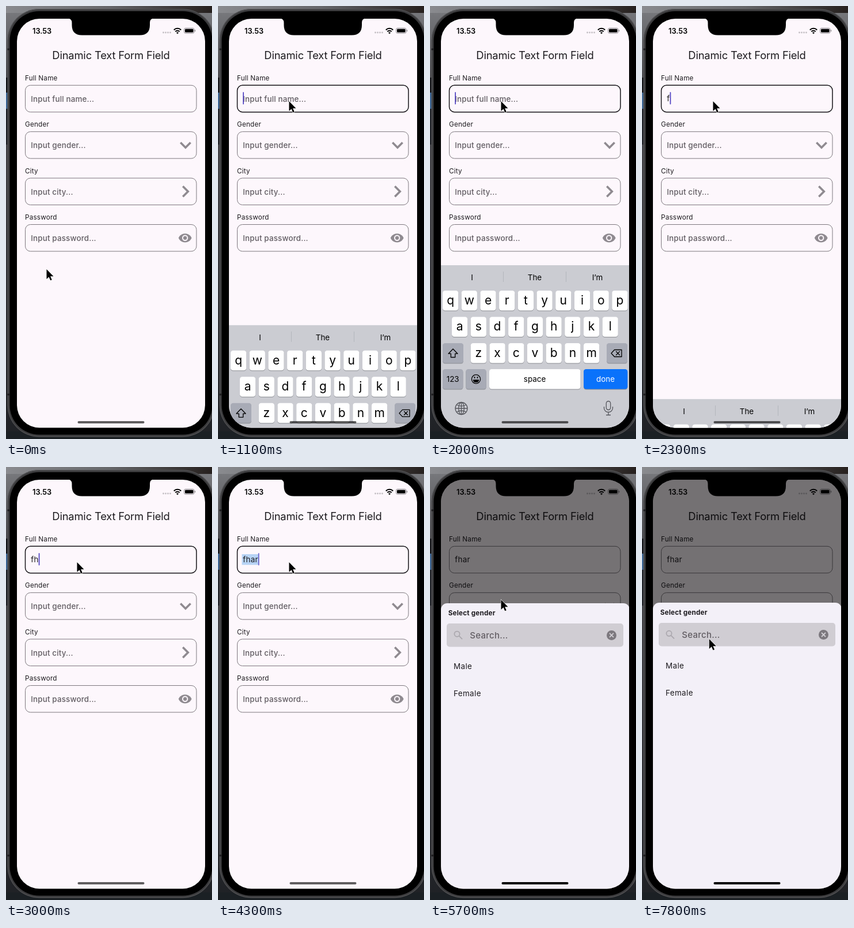
These frames come from a looping animation (358x750 px, 8 s). An HTML page:

```html
<!DOCTYPE html>
<html lang="en">
<head>
<meta charset="utf-8">
<title>Text form fields</title>
<style>
  html, body { margin: 0; width: 100%; height: 100%; overflow: hidden; background: #000; }
  svg { display: block; width: 358px; height: 750px; }
  text { font-family: Inter, "Open Sans", sans-serif; font-optical-sizing: none; fill: #1d1b1f; white-space: pre; }
  .mid { text-anchor: middle; }
  .title { font-size: 18.4px; letter-spacing: -.2px; }
  .label { font-size: 11.7px; letter-spacing: .2px; }
  .hint { font-size: 13.4px; font-weight: 500; letter-spacing: .15px; fill: #625d63; }
  .value { font-size: 13.4px; letter-spacing: .3px; }
  .clock { font-size: 12.8px; font-weight: 600; fill: #000; }
  .key { font-size: 21px; fill: #000; }
  .word { font-size: 13.4px; fill: #000; }
  .box { fill: none; stroke: #7d787e; stroke-width: 1; }
  .chevron { fill: none; stroke: #8f8a90; stroke-width: 3.6; }
  .line { fill: none; stroke: #55565c; stroke-width: 1.3; }
  .ink { fill: none; stroke: #000; stroke-width: 1.3; stroke-linejoin: round; stroke-linecap: round; }
</style>
</head>
<body>
<svg id="stage" viewBox="0 0 358 750"></svg>
<script>
const LOOP = 8000, STEP = 100;
const BOTTOM = 731, KEYS_H = 282, SHEET_TOP = 235;
const NAME = 'fhar';

const rect = (x, y, w, h, r, attrs) =>
  `<rect x="${x}" y="${y}" width="${w}" height="${h}" rx="${r}" ${attrs}/>`;
const text = (x, y, cls, str, attrs = '') =>
  `<text x="${x}" y="${y}" class="${cls}" ${attrs}>${str}</text>`;

function field(i, label, hint) {
  const y = 137.3 + i * 80.4;
  return text(33, y - 8.6, 'label', label) +
    rect(33.5, y, 297.5, 46.4, 9, `class="box" id="box${i}"`) +
    text(43.3, y + 28.4, 'hint', hint, `id="hint${i}"`);
}

function key(x, y, w, fill = '#fff') {
  return rect(x, y + 1, w, 34.5, 4.2, 'fill="#8b8d93"') + rect(x, y, w, 34.5, 4.2, `fill="${fill}"`);
}

function keyRow(letters, x0, y) {
  return [...letters].map((c, i) => {
    const x = x0 + i * 32.7;
    return key(x, y, 27.2) + text(x + 13.6, y + 23.8, 'key mid', c);
  }).join('');
}

function keyboard() {
  const gray = '#a8abb6';
  return `<g id="keys">
    ${rect(19, 0, 328, 300, 0, 'fill="#cbccd2"')}
    ${text(73, 26, 'word mid', 'I')}${text(182, 26, 'word mid', 'The')}${text(291, 26, 'word mid', 'I’m')}
    <path d="M127.5 11v18M236.5 11v18" stroke="#b4b6bc"/>
    ${keyRow('qwertyuiop', 22, 44)}${keyRow('asdfghjkl', 38, 89.5)}${keyRow('zxcvbnm', 70.8, 135)}
    ${key(22, 135, 36, gray)}${key(307, 135, 36, gray)}
    <path class="ink" d="M40 145l8 8.2h-4.3v6.3h-7.4v-6.3h-4.3z"/>
    <path class="ink" d="M320.5 146.5h12.5v12h-12.5l-5.5-6zM323.5 149.5l6 6M329.500 149.5l-6 6"/>
    ${key(22, 180, 35.4, gray)}${key(62.300, 180, 35.4, gray)}${key(103, 180, 158.5)}${key(267, 180, 76.3, '#0a72fb')}
    ${text(39.7, 202, 'word mid', '123')}${text(182, 202, 'word mid', 'space')}
    ${text(305, 202, 'word mid', 'done', 'style="fill:#fff"')}
    <g class="ink"><circle cx="80" cy="197.3" r="7.6"/><path d="M75.500 199a4.6 4.300 0 0 0 9 0z" fill="#000"/>
      <path d="M77.500 194v1M82.500 194v1" stroke-width="1.8"/></g>
    <g class="line"><circle cx="54.500" cy="248" r="10.5"/><ellipse cx="54.500" cy="248" rx="4.8" ry="10.5"/>
      <path d="M54.500 237.500v21M44 248h21M46.500 242q8 4 16 0M46.500 254q8 -4 16 0"/></g>
    <g class="line">${rect(306.3, 235.5, 7.4, 15, 3.7, '')}<path d="M302.500 245v2.500a7.500 7 0 0 0 15 0v-2.500M310 254.500v5M306 259.500h8"/></g>
  </g>`;
}

function sheet() {
  return `<g id="sheet">
    ${rect(19, 0, 328, 520, 11, 'fill="#f3f0f8"')}
    ${text(31.7, 21, 'label', 'Select gender', 'style="font-weight:700"')}
    ${rect(29, 35, 307, 40.5, 5, 'fill="#d0cdd3"')}
    <g fill="none" stroke="#aaa7ad" stroke-width="1.700"><circle cx="47" cy="53.300" r="4.600"/><path d="M50.500 56.800l5.500 5.500"/></g>
    ${text(69.3, 61, 'hint', 'Search...', 'style="font-size:15px;letter-spacing:.25px"')}
    ${rect(69, 43, 1.7, 22, .8, 'fill="#5548c4" id="searchCaret"')}
    <circle cx="315.500" cy="55.500" r="8.500" fill="#7c787e"/>
    <path d="M312 52l7 7M319 52l-7 7" stroke="#d0cdd3" stroke-width="1.800"/>
    ${text(41, 114, 'value', 'Male', 'style="letter-spacing:.4px"')}
    ${text(41, 161, 'value', 'Female', 'style="letter-spacing:.4px"')}
  </g>`;
}

function backdrop() {
  return rect(0, 0, 358, 750, 0, 'fill="url(#wall)"') + rect(0, 0, 358, 12, 0, 'fill="url(#top)"') +
    rect(0, 124, 5, 26, 0, 'fill="#15161a"') + rect(0, 150, 5, 28, 0, 'fill="#3d6796"') +
    rect(0, 178, 5, 62, 0, 'fill="#202329"') + rect(0, 737, 358, 13, 0, 'fill="#1b2024"') +
    rect(2.5, 5, 360, 741.5, 55, 'fill="#3b3b3d"') +
    rect(3.2, 5.700, 358.600, 740, 54, 'fill="none" stroke="#59595b"') +
    rect(6.500, 9, 352, 733.500, 51, 'fill="#000"') +
    '<path d="M2.500 75h4M2.500 673h4" stroke="#1c1c1e" stroke-width="3"/>';
}

document.getElementById('stage').innerHTML = `
  <defs>
    <linearGradient id="wall" x2="0" y2="1"><stop stop-color="#7b7c80"/><stop offset=".17" stop-color="#4a4a4e"/>
      <stop offset=".5" stop-color="#3b3b40"/><stop offset="1" stop-color="#1f2125"/></linearGradient>
    <linearGradient id="top"><stop stop-color="#8a8b8f"/><stop offset=".5" stop-color="#66676a"/><stop offset="1" stop-color="#26201e"/></linearGradient>
    <clipPath id="screen">${rect(19, 22, 327, 708.500, 39, '')}</clipPath>
  </defs>
  ${backdrop()}
  <g clip-path="url(#screen)">
    ${rect(19, 22, 328, 710, 0, 'fill="#fdf7fc"')}
    ${text(46, 47.8, 'clock', '13.53')}
    <g fill="#c3bec3">${[273.5, 277.5, 281.5, 285.5].map(x => `<circle cx="${x}" cy="46" r="1.400"/>`).join('')}</g>
    <g fill="none" stroke="#000" stroke-width="2"><path d="M291.800 41.500a8.600 8.600 0 0 1 12.400 0M294.300 44.300a5.200 5.200 0 0 1 7.400 0"/></g>
    <path d="M298 48.500l-2 -2.300a2.900 2.900 0 0 1 4 0z"/>
    ${rect(309.5, 38.3, 17.6, 9, 2.6, 'fill="none" stroke="#8f8b90"')}${rect(311, 39.8, 14.6, 6, 1.4, '')}
    <path d="M328.500 41.300v3" stroke="#8f8b90" stroke-width="1.300"/>
    ${text(182.5, 92.3, 'title mid', 'Dinamic Text Form Field')}
    ${field(0, 'Full Name', 'Input full name...')}
    ${field(1, 'Gender', 'Input gender...')}
    ${field(2, 'City', 'Input city...')}
    ${field(3, 'Password', 'Input password...')}
    ${rect(41.5, 151, 29.500, 18.500, 0, 'fill="#b7d3f5" id="mark"')}
    ${text(43.3, 165.2, 'value', '', 'id="value"')}
    ${rect(0, 149, 1.8, 21.500, .9, 'fill="#5548c4" id="caret"')}
    <path class="chevron" d="M303.300 236.500l8.700 8.700l8.700 -8.700M307.300 312.300l9 9l-9 9"/>
    <path d="M299.800 401.800c4 -10.200 18.800 -10.200 22.800 0c-4 10.200 -18.800 10.200 -22.800 0z" fill="#8f8a90"/>
    <circle cx="311.200" cy="401.800" r="4.200" fill="#8f8a90" stroke="#fdf7fc" stroke-width="2"/>
    ${keyboard()}
    ${rect(19, 22, 328, 710, 0, 'id="scrim"')}
    ${sheet()}
    ${rect(124.5, 719, 116, 4, 2, 'id="home"')}
  </g>
  <path d="M107 21.500q7.500 0 7.500 7.500v4q0 17.500 17.500 17.500h100.500q17.500 0 17.500 -17.500v-4q0 -7.500 7.500 -7.500z"/>
  <path id="pointer" d="M0 0v17l4 -3.800l2.700 6.100l2.600 -1.100l-2.700 -6h5.400z" stroke="#fff" stroke-width="1.100" paint-order="stroke"/>`;

const el = {};
document.querySelectorAll('[id]').forEach(n => el[n.id] = n);

const POINTER = [[0, 70.5, 456], [100, 132, 146], [200, 132, 146], [700, 123.5, 165],
  [5000, 123.5, 165], [5300, 123.5, 230], [5900, 123.5, 230], [6400, 125.5, 311],
  [6800, 117.500, 299], [6900, 116.8, 298]];
const CARET = [[990, 0], [1000, 1], [1400, 1], [1600, 0], [1700, 0], [2000, 1], [2600, 1], [2800, 0],
  [2990, 0], [3000, 1], [3600, 1], [3800, 0], [4200, 0], [4300, .8], [4400, 1], [4600, 1], [4800, 0],
  [5000, 0], [5200, 1], [5300, 0]];
const TYPED = [2200, 3000, 3200, 3300];

// Linear interpolation through [time, ...values] keys.
function track(keys, t) {
  const i = keys.findIndex(k => k[0] > t);
  if (i < 0) return keys[keys.length - 1].slice(1);
  if (i === 0) return keys[0].slice(1);
  const a = keys[i - 1], b = keys[i], p = (t - a[0]) / (b[0] - a[0]);
  return a.slice(1).map((v, j) => v + (b[j + 1] - v) * p);
}

// Critically damped spring from 0 to 1.
function spring(ms, rate) {
  const x = Math.max(0, ms) / 1000 * rate;
  return 1 - (1 + x) * Math.exp(-x);
}

const show = (node, on) => node.setAttribute('visibility', on ? 'visible' : 'hidden');
const shift = (node, x, y) => node.setAttribute('transform', `translate(${x} ${y})`);

function draw(t) {
  const focused = t >= 1000 && t < 5300;
  el.box0.style.stroke = focused ? '#161418' : '';
  el.box0.style.strokeWidth = focused ? 1.5 : '';

  const count = TYPED.filter(k => t >= k).length;
  el.value.textContent = NAME.slice(0, count);
  show(el.hint0, count === 0);
  show(el.mark, focused && t >= 3400);
  el.caret.setAttribute('x', 43.2 + (count ? el.value.getComputedTextLength() : 0));
  el.caret.setAttribute('opacity', track(CARET, t)[0]);

  const raised = t < 2200 ? spring(t - 957, 15) : 1 - spring(t - 2120, 17.5);
  show(el.keys, raised > .002);
  shift(el.keys, 0, BOTTOM - KEYS_H * raised);

  const open = t < 5350 ? 0 : 1 - Math.exp(-.018 * (t - 5350));
  show(el.sheet, open > 0);
  shift(el.sheet, 0, BOTTOM - (BOTTOM - SHEET_TOP) * open);
  el.scrim.setAttribute('opacity', .54 * open);
  show(el.searchCaret, t >= 7100 && t < 7800);
  el.home.setAttribute('opacity', .62 + .38 * open);

  shift(el.pointer, ...track(POINTER, t));
}

const start = performance.now();
function tick() {
  const t = (performance.now() - start) % LOOP;
  draw(Math.floor((t + 1) / STEP) * STEP % LOOP);
  requestAnimationFrame(tick);
}
tick();
</script>
</body>
</html>
```
